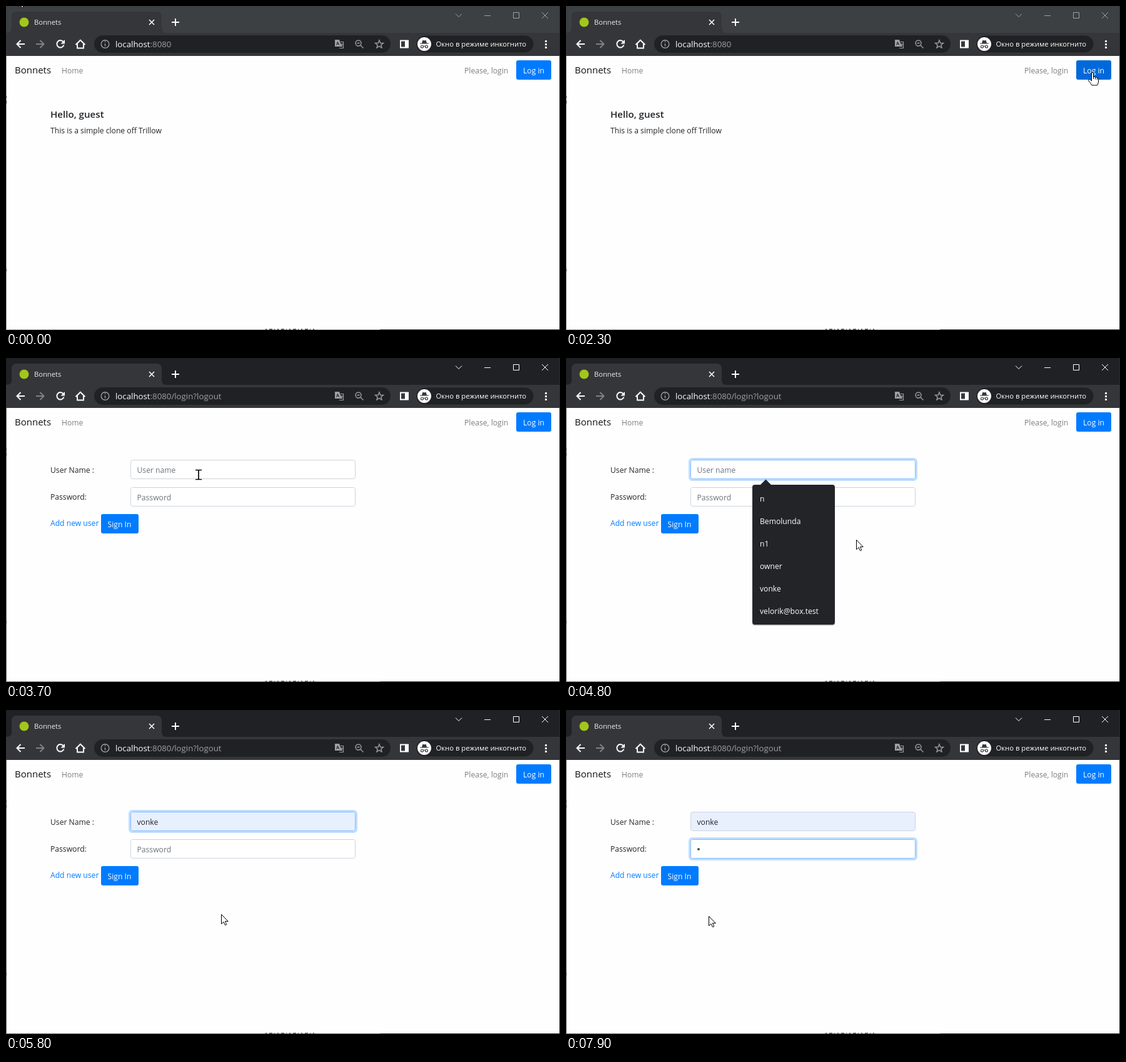
Recreate the animation shown at these times as an HTML page. Size 886x519 px, loop 8000 ms.

```html
<!DOCTYPE html>
<html lang="en">
<head>
<meta charset="utf-8">
<title>Login demo</title>
<style>
  html, body { margin: 0; width: 100%; height: 100%; overflow: hidden; background: #fff; }
  svg { display: block; width: 886px; height: 519px; }
  text { font: 12.15px "Open Sans", "Noto Sans", sans-serif; fill: #212529; white-space: pre; }
  .tab { font-size: 11.2px; fill: #e8eaed; }
  .url { font-size: 13.25px; fill: #9aa0a6; }
  .host, .light { fill: #fff; }
  .mode { font-size: 11.25px; fill: #fff; }
  .brand { font-size: 15px; fill: #111; }
  .head { font-size: 15.1px; font-weight: 600; }
  .muted { fill: #7f7f7f; }
  .hint { fill: #6c757d; }
  .link { fill: #007bff; }
  .preview { font: 10.7px "Liberation Sans", Arial, sans-serif; fill: #000; }
  .line { fill: none; stroke: #fff; stroke-width: 2; }
  .grey { stroke: #9aa0a6; stroke-width: 1.4; }
  .ring { fill: none; stroke: #007bff; stroke-opacity: .25; stroke-width: 3; }
  .btn { fill: #007bff; }
</style>
</head>
<body>
<svg viewBox="0 0 886 519">
  <rect width="886" height="519" fill="#fefefe"/>

  <!-- browser frame -->
  <rect id="bar" width="886" height="44"/>
  <path d="M1 43Q9 43 9 35V17Q9 9 17 9H241Q249 9 249 17V35Q249 43 257 43H886V80H0V43Z" fill="#35363a"/>
  <circle cx="29" cy="26" r="7.5" fill="#a3c61c"/>
  <text class="tab" x="45" y="30">Bonnets</text>
  <path class="line" d="M229 22l8 8m0-8l-8 8" style="stroke-width:1.6"/>
  <path class="line" d="M265 26h12m-6-6v12" style="stroke-width:1.9"/>
  <path id="controls" fill="none" d="M719 12.5l5 5 5-5M765 15.5h10M811.5 10.5h9v9h-9zM857 10l10 10m0-10l-10 10"/>

  <!-- toolbar -->
  <path class="line" d="M30 61H17.5m6-6l-6 6 6 6"/>
  <path class="line" d="M48 61h12.500m-6-6l6 6-6 6" style="stroke:#808184"/>
  <path class="line" d="M91.500 57.200A5.700 5.700 0 1 0 92.500 62.500"/>
  <path d="M94 54v6.500h-6.500z" fill="#fff"/>
  <path class="line" d="M111.500 62l7.500-7.300 7.500 7.300M114 60v7.500h10V60" style="stroke-width:1.9"/>
  <rect x="141" y="47" width="474" height="28" rx="14" fill="#202124"/>
  <circle class="line grey" cx="158.500" cy="61" r="6.300"/>
  <path class="line grey" d="M158.500 60v4.500m0-8v1.600"/>
  <text class="url" x="175" y="66"><tspan class="host">localhost</tspan>:8080<tspan id="path"></tspan></text>
  <path d="M526 54h7l4 11h-11z" fill="#9aa0a6"/>
  <path class="line grey" d="M535 57.500h4.500v10H533M534 61h5m-1 0q-1 3-3 4m0-3l3 3" style="stroke-width:1.100"/>
  <path class="line" d="M528.500 62.500l2-5 2 5m-3.300-1.700h2.600" style="stroke:#202124;stroke-width:1"/>
  <circle class="line grey" cx="563.500" cy="59.500" r="4.500"/>
  <path class="line grey" d="M567 63l4.500 4.500M561.300 59.500h4.400"/>
  <path id="star" class="line grey"/>
  <path class="line" d="M631 55.500h12v11h-12z"/>
  <path d="M638 55h6v12h-6z" fill="#fff"/>
  <rect x="656.500" y="47.500" width="187" height="27" rx="13.500" fill="#202124"/>
  <circle cx="669" cy="61" r="11" fill="#fff"/>
  <path d="M662 60.500v-1h3l1.500-5 2.500 1 2.500-1 1.500 5h3v1z" fill="#35363a"/>
  <path d="M667.500 64.500q1.500-1 3 0" fill="none" stroke="#35363a"/>
  <circle cx="665.500" cy="65" r="2" fill="none" stroke="#35363a" stroke-width="1.200"/>
  <circle cx="672.500" cy="65" r="2" fill="none" stroke="#35363a" stroke-width="1.200"/>
  <text class="mode" x="687.500" y="65">Окно в режиме инкогнито</text>
  <path d="M862 55h3v3h-3zm0 5h3v3h-3zm0 5h3v3h-3z" fill="#f1f3f4"/>

  <!-- navigation -->
  <text class="brand" x="14" y="108">Bonnets</text>
  <text class="muted" x="89" y="108">Home</text>
  <text class="muted" x="733" y="108">Please, login</text>
  <rect id="loginRing" class="ring" x="814.500" y="85.500" width="59" height="34" rx="4.500"/>
  <rect id="login" x="816" y="87" width="56" height="31" rx="3"/>
  <text class="light" x="827" y="108">Log in</text>

  <g id="welcome">
    <text class="head" x="71" y="179">Hello, guest</text>
    <text x="71" y="204">This is a simple clone off Trillow</text>
  </g>

  <g id="form">
    <text x="71" y="184">User Name :</text>
    <text x="71" y="227">Password:</text>
    <rect id="userRing" class="ring" x="197.500" y="161.500" width="363" height="34" rx="4.500"/>
    <rect id="user" x="199.500" y="163.500" width="359" height="30" rx="3"/>
    <text id="userText" x="209.500" y="184"></text>
    <rect id="passRing" class="ring" x="197.500" y="205.500" width="363" height="34" rx="4.500"/>
    <rect id="pass" x="199.500" y="207.500" width="359" height="30" rx="3" fill="#fff"/>
    <text id="passHint" class="hint" x="209.500" y="228">Password</text>
    <circle id="dot" cx="212" cy="223" r="2" fill="#495057"/>
    <rect id="caret" width="1" height="17" fill="#333"/>
    <text class="link" x="71" y="269">Add new user</text>
    <rect class="btn" x="152" y="250" width="60" height="31" rx="3"/>
    <text class="light" x="162.500" y="271">Sign In</text>
  </g>

  <g id="menu">
    <rect x="298" y="204.500" width="132" height="224" rx="4" fill="#000" opacity=".3"/>
    <path d="M310 204l9.500-9.500 9.500 9.500z" fill="#232428"/>
    <rect x="298" y="203" width="132" height="224" rx="4" fill="#232428"/>
    <rect id="mark" x="298" width="132" height="36" fill="#3f4042"/>
  </g>

  <!-- window edge -->
  <path id="edge" d="M.5 80V518.500H598" fill="none"/>
  <path d="M885.500 0V519M598 518.500H886" fill="none" stroke="#2b2c2f"/>
  <path d="M0 146h1m-1 7h1m-1 2h1M0 423h1" stroke="#333" stroke-width="3"/>
  <path d="M415 518h78" stroke="#555" stroke-width="2" stroke-dasharray="2 4 5 3 1 4"/>

  <!-- pointers -->
  <g id="arrow"><path d="M.5.5V15.700L4 12.500 6.500 17.700 8.800 16.700 6.400 11.500H11.200Z" fill="#fff" stroke="#000"/></g>
  <g id="hand"><path d="M-1.500 14V2Q-1.500.5 0 .5 1.500.5 1.500 2V7.500Q3.500 6.500 4.500 8.300 6.500 7.500 7.300 9.200 9.500 8.700 9.500 11V15Q9.500 18 7.500 21H-1Q-3 17.500-6 14-7.200 12-5.500 11.300-4.300 11-1.500 14ZM1.500 7.500V11M4.500 8.500V11.500M7.300 9.500V12" fill="#fff" stroke="#000"/></g>
  <g id="beam">
    <path id="beamEdge" d="M-5-7.500h4l1 1 1-1h4M0-7V7M-5 7.500h4l1-1 1 1h4" fill="none" stroke="#fff" stroke-width="3.500"/>
    <path d="M-5-7.500h4l1 1 1-1h4M0-7V7M-5 7.500h4l1-1 1 1h4" fill="none" stroke="#000" stroke-width="1.700"/>
  </g>
</svg>
<script>
const LOOP = 8000, STEP = 100, ROW = 36, ROWS_TOP = 207;
const names = ["n", "Bemolunda", "n1", "owner", "vonke", "velorik@box.test"];
const $ = id => document.getElementById(id);
const set = (id, attrs) => { for (const k in attrs) $(id).setAttribute(k, attrs[k]); };
const show = (id, on) => { $(id).style.display = on ? "" : "none"; };
const within = (t, a, b) => t >= a && t < b;
const ramp = (t, a, b) => Math.min(1, Math.max(0, (t - a) / (b - a)));
const mix = (a, b, k) => a + (b - a) * k;
const blend = (a, b, k) => `rgb(${a.map((v, i) => Math.round(mix(v, b[i], k)))})`;

// pointer path: time, x, y
const route = [
  [0, 19, -15], [900, 19, -15], [1000, 130, 40], [1100, 380, 110], [1200, 640, 150],
  [1300, 768, 168], [1400, 690, 180], [1500, 480, 186], [1600, 241, 188],
  [1700, 95, 187], [1800, 25, 183], [1900, 25, 183], [2000, 150, 168],
  [2100, 440, 140], [2200, 735, 122], [2300, 842, 106], [2900, 842, 106],
  [3000, 770, 140], [3100, 620, 195], [3200, 470, 245], [3300, 386, 262],
  [3400, 386, 262], [3500, 362, 240], [3600, 325, 205], [3700, 308, 187],
  [4400, 308, 187], [4500, 360, 215], [4600, 440, 265], [4700, 473, 288],
  [4800, 464, 291], [4900, 464, 291], [5000, 440, 328], [5100, 392, 358],
  [5200, 364, 371], [5500, 364, 371], [5600, 362, 369], [5700, 362, 369],
  [5900, 325, 285], [6100, 303, 223], [7500, 303, 223], [7600, 312, 290],
  [7700, 300, 367], [7800, 252, 356], [7900, 228, 330]
];

function pointAt(t) {
  const i = route.findIndex(p => p[0] > t);
  if (i < 0) return route[route.length - 1].slice(1);
  const a = route[i - 1], b = route[i], k = ramp(t, a[0], b[0]);
  return [mix(a[1], b[1], k), mix(a[2], b[2], k)];
}

const inside = (x, y, l, t, r, b) => x >= l && x < r && y >= t && y < b;

names.forEach((name, i) => {
  const item = document.createElementNS("http://www.w3.org/2000/svg", "text");
  item.setAttribute("class", "light");
  item.setAttribute("x", 310);
  item.setAttribute("y", ROWS_TOP + ROW * i + 23);
  item.textContent = name;
  $("menu").append(item);
});

let star = "";
for (let i = 0; i < 10; i++) {
  const r = i % 2 ? 2.9 : 6.8, a = i * Math.PI / 5;
  star += (i ? "L" : "M") + (597 + r * Math.sin(a)).toFixed(1) + " " + (61.5 - r * Math.cos(a)).toFixed(1);
}
set("star", { d: star + "Z" });

function drawPointer(t, x, y, menu, form) {
  const overButton = inside(x, y, 816, 87, 872, 118);
  const overField = form && inside(x, y, 199, 163, 559, 238) && (y < 194 || y >= 207);
  const overMenu = menu && inside(x, y, 298, 203, 430, 427);
  const kind = overButton ? "hand" : overField && !overMenu ? "beam" : "arrow";
  for (const id of ["arrow", "hand", "beam"]) show(id, id === kind);
  set(kind, { transform: `translate(${Math.round(x)} ${Math.round(y)})` });
  set("login", { fill: overButton ? "#0069d9" : "#007bff" });
  const row = overMenu ? Math.floor((y - ROWS_TOP) / ROW) : -1;
  return row;
}

function drawField(id, focus, fill) {
  set(id, { stroke: blend([206, 212, 218], [128, 189, 255], focus), fill });
  set(id + "Ring", { opacity: focus });
}

function draw(t) {
  const active = t >= 2800, form = t >= 3100, menu = within(t, 4100, 5700);
  const filled = t >= 5700, typed = t >= 7200;
  set("bar", { fill: active ? "#202124" : "#3c4043" });
  set("controls", { stroke: active ? "#fff" : "#a0a2a5" });
  set("edge", { stroke: active ? "#6a6a6a" : "#9a9a9a" });
  $("path").textContent = form ? "/login?logout" : "";
  show("welcome", !form);
  show("form", form);
  show("menu", menu);
  show("loginRing", within(t, 2900, 3100));

  const row = drawPointer(t, ...pointAt(t), menu, form);
  const preview = !filled && row >= 0 && row < names.length;
  show("mark", row >= 0);
  set("mark", { y: ROWS_TOP + ROW * Math.max(0, row) });

  const left = ramp(t, 6300, 6500);
  drawField("user", ramp(t, 4000, 4200) * (1 - left), filled || preview ? "#e8f0fe" : "#fff");
  drawField("pass", left, "#fff");
  $("userText").textContent = filled ? names[4] : preview ? names[row] : "User name";
  set("userText", { class: filled ? "" : preview ? "preview" : "hint" });
  show("passHint", !typed);
  show("dot", typed);

  const inUser = within(t, 4100, 4600);
  show("caret", inUser || within(t, 6300, 6800) || within(t, 7200, 7700));
  set("caret", { x: typed ? 215 : 210, y: inUser ? 170 : 214 });
}

const start = performance.now();
function tick() {
  const t = (performance.now() - start) % LOOP;
  draw(Math.floor(t / STEP) * STEP);
  requestAnimationFrame(tick);
}
tick();
</script>
</body>
</html>
```
